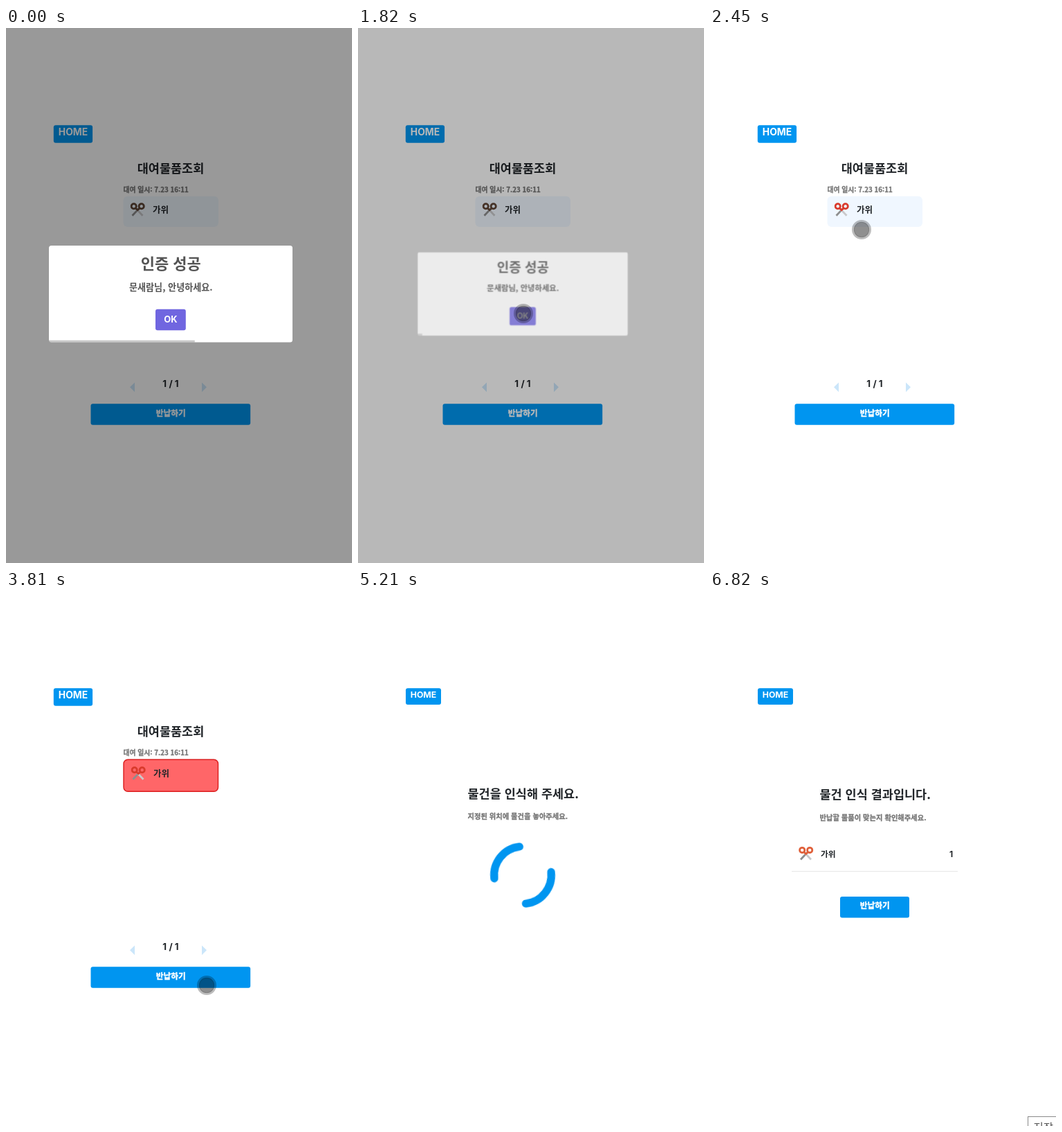
An HTML page that plays this animation: 500x772 px, repeating every 7.95 s.

```html
<!DOCTYPE html>
<html lang="ko">
<head>
<meta charset="utf-8">
<title>물품 반납</title>
<style>
  html, body { margin: 0; width: 100%; height: 100%; overflow: hidden; background: #fff; }
  svg { display: block; width: 500px; height: 772px; }
  text { font: 700 12px 'Noto Sans CJK KR', 'Noto Sans CJK', sans-serif; fill: #212529; }
  .mid { text-anchor: middle; }
  .latin { font-family: Inter, sans-serif; }
  .title { font-size: 17.5px; }
  .sub { font-size: 10.3px; fill: #777; stroke: #777; stroke-width: .3px; }
  .name { font-size: 12.5px; }
  .white { fill: #fff; }
  .action { font-size: 11.7px; fill: #fff; stroke: #fff; stroke-width: .4px; }
  .soft { fill: #545454; }
  .btn { fill: #0095f0; }

  /* hard scene changes */
  .list, .home-a, .page-b, .scan, .result, .tip, .item, .picked, .tools, .cursor {
    animation: 7.95s step-end infinite;
  }
  .list { animation-name: list; }
  .home-a { animation-name: home-a; }
  .page-b { animation-name: page-b; }
  .scan { animation-name: scan; }
  .result { animation-name: result; }
  .tip { animation-name: tip; }
  .item { animation-name: item; }
  .picked { animation-name: picked; }
  .tools { animation-name: tools; }
  @keyframes list { 0% { visibility: visible } 55.72%, 100% { visibility: hidden } }
  @keyframes home-a { 0% { visibility: visible } 56.86%, 100% { visibility: hidden } }
  @keyframes page-b { 0% { visibility: hidden } 56.86%, 100% { visibility: visible } }
  @keyframes scan { 0% { visibility: hidden } 56.86% { visibility: visible } 85.53%, 100% { visibility: hidden } }
  @keyframes result { 0% { visibility: hidden } 85.53%, 100% { visibility: visible } }
  @keyframes tip { 0% { visibility: hidden } 74.21%, 100% { visibility: visible } }
  @keyframes item { 0% { transform: none } 34.59%, 100% { transform: translate(1px, 1px) } }
  @keyframes picked { 0% { opacity: 0 } 34.59%, 100% { opacity: 1 } }
  @keyframes tools { 0% { color: #5f4536 } 24.11%, 100% { color: #d93a2c } }

  /* dialog */
  .shade { animation: shade 7.95s linear infinite; }
  .modal { transform-origin: 238px 383.5px; animation: modal 7.95s linear infinite; }
  .timer { transform-origin: 62px 0; animation: timer 7.95s linear infinite; }
  @keyframes shade { 0%, 22.39% { opacity: .4 } 24.11%, 100% { opacity: 0 } }
  @keyframes modal {
    0%, 22.39% { transform: scale(1); opacity: 1 }
    24.28%, 100% { transform: scale(.5); opacity: 0 }
  }
  @keyframes timer { 0% { transform: scaleX(1) } 22.39%, 100% { transform: scaleX(.038) } }

  /* one turn per second */
  .spin { transform-origin: 238px 410px; animation: spin 7.95s linear infinite; }
  @keyframes spin { from { transform: rotate(97.4deg) } to { transform: rotate(2959.4deg) } }

  .cursor { animation-name: shown; }
  .path { animation: path 7.95s linear infinite; }
  @keyframes shown { 0% { visibility: visible } 56.35%, 100% { visibility: hidden } }
  @keyframes path {
    0%, 3.14% { transform: translate(460px, 800px) }
    5.66% { transform: translate(380px, 660px) }
    8.18% { transform: translate(280px, 495px) }
    10.19% { transform: translate(242px, 440px) }
    13.71% { transform: translate(240px, 432px) }
    16.35% { transform: translate(241px, 376px) }
    18.62% { transform: translate(240px, 408px) }
    21.38%, 23.77% { transform: translate(239px, 412px) }
    25.79% { transform: translate(239px, 411px) }
    27.92% { transform: translate(226px, 345px) }
    30.82% { transform: translate(219px, 291px) }
    32.7% { transform: translate(218px, 284px) }
    35.85% { transform: translate(218px, 282px) }
    38.36% { transform: translate(255px, 450px) }
    41.01% { transform: translate(290px, 572px) }
    41.89%, 44.03% { transform: translate(290px, 579px) }
    45.28%, 51.57% { transform: translate(290px, 569px) }
    54.09% { transform: translate(360px, 640px) }
    56.1%, 100% { transform: translate(395px, 679px) }
  }
</style>
</head>
<body>
<svg viewBox="0 0 500 772">
  <defs>
    <symbol id="scissors" width="22" height="21" viewBox="0 0 22 21">
      <path d="M12.6 8.6 3 18.8" stroke="#8e8e8e" stroke-width="2.8"/>
      <path d="M8.4 8.6 18 18.8" stroke="#c9c9cb" stroke-width="2.8"/>
      <g fill="none" stroke="currentColor" stroke-width="2.8">
        <circle cx="5.2" cy="5.2" r="3.6"/>
        <circle cx="16.2" cy="5.2" r="3.6"/>
        <path d="M7.7 8 10.7 10.6 13.7 8"/>
      </g>
    </symbol>
    <clipPath id="card"><rect x="62" y="314" width="352" height="139.5" rx="3.5"/></clipPath>
  </defs>

  <rect width="500" height="772" fill="#fff"/>

  <g class="home-a">
    <rect class="btn" x="68.8" y="140.2" width="56.3" height="25.6" rx="3"/>
    <text class="latin white mid" x="97" y="155.4" style="font-size:13.9px">HOME</text>
  </g>

  <g class="list">
    <text class="title mid" x="238" y="208.5">대여물품조회</text>
    <text class="sub" x="169.5" y="236.8" style="font-size:9.8px">대여 일시: 7.23 16:11</text>
    <rect x="169.5" y="242.7" width="137.5" height="44.3" rx="6" fill="#f0f7ff"/>
    <rect class="picked" x="170" y="243.2" width="136.5" height="46" rx="6" fill="#ff6668" stroke="#dc1c1c" stroke-width="1.4"/>
    <g class="item">
      <g class="tools"><use href="#scissors" x="179.5" y="252"/></g>
      <text class="name" x="212" y="267.2">가위</text>
    </g>
    <path d="M179 518.3 186 511.5V525.2ZM290 518.3 283 511.5V525.2Z" fill="#cbe6fa"/>
    <text class="latin mid" x="238" y="518" style="font-size:13.5px">1 / 1</text>
    <rect class="btn" x="122.5" y="542.2" width="230.7" height="30.6" rx="3"/>
    <text class="action mid" x="238.3" y="560.3">반납하기</text>
  </g>

  <g class="page-b">
    <rect class="btn" x="69" y="140.3" width="51" height="23.8" rx="3"/>
    <text class="latin white mid" x="94.5" y="154.4" style="font-size:12.3px">HOME</text>
  </g>

  <g class="scan">
    <text class="title" x="158.5" y="298.6">물건을 인식해 주세요.</text>
    <text class="sub" x="158.5" y="328.9">지정된 위치에 물건을 놓아주세요.</text>
    <circle class="spin" cx="238" cy="410" r="41.3" fill="none" stroke="#0095f0" stroke-width="11.3"
      stroke-linecap="round" stroke-dasharray="64.87"/>
  </g>

  <g class="result">
    <text class="title" x="158.5" y="299.6">물건 인식 결과입니다.</text>
    <text class="sub" x="158.5" y="330.9">반납할 물품이 맞는지 확인해주세요.</text>
    <g color="#e0603a"><use href="#scissors" x="128" y="368.7"/></g>
    <text x="160" y="384.4" style="font-size:11.8px">가위</text>
    <text class="latin mid" x="348.7" y="384.3">1</text>
    <path d="M118 404.5H358" stroke="#e6e6e6"/>
    <rect class="btn" x="188" y="441" width="100" height="30.5" rx="3"/>
    <text class="action mid" x="238.3" y="458.3">반납하기</text>
  </g>

  <g class="tip">
    <rect x="459.5" y="758.5" width="60" height="30" fill="#fff" stroke="#8a8a8a"/>
    <text x="467.5" y="779.5" style="font-size:15.5px;font-weight:400;fill:#555">저장</text>
  </g>

  <rect class="shade" width="500" height="772"/>
  <g class="modal">
    <g clip-path="url(#card)">
      <rect x="62" y="314" width="352" height="140" fill="#fff"/>
      <rect class="timer" x="62" y="450.6" width="211" height="3" fill="#c8c8c8"/>
    </g>
    <text class="soft mid" x="238.3" y="348" style="font-size:22px">인증 성공</text>
    <text class="soft mid" x="238.3" y="378.5" style="font-size:13.1px">문새람님, 안녕하세요.</text>
    <rect x="216" y="405.8" width="43.8" height="30.4" rx="3" fill="#7066e0"/>
    <text class="latin white mid" x="238" y="424.6" style="font-size:13px">OK</text>
  </g>

  <g class="cursor">
    <g class="path">
      <circle r="12.6" fill="none" stroke="#000" stroke-opacity=".26" stroke-width="2.8"/>
      <circle r="11.2" fill-opacity=".44"/>
      <circle r="10.6" fill="none" stroke="#000" stroke-opacity=".1" stroke-width="1.2"/>
    </g>
  </g>
</svg>
</body>
</html>
```
